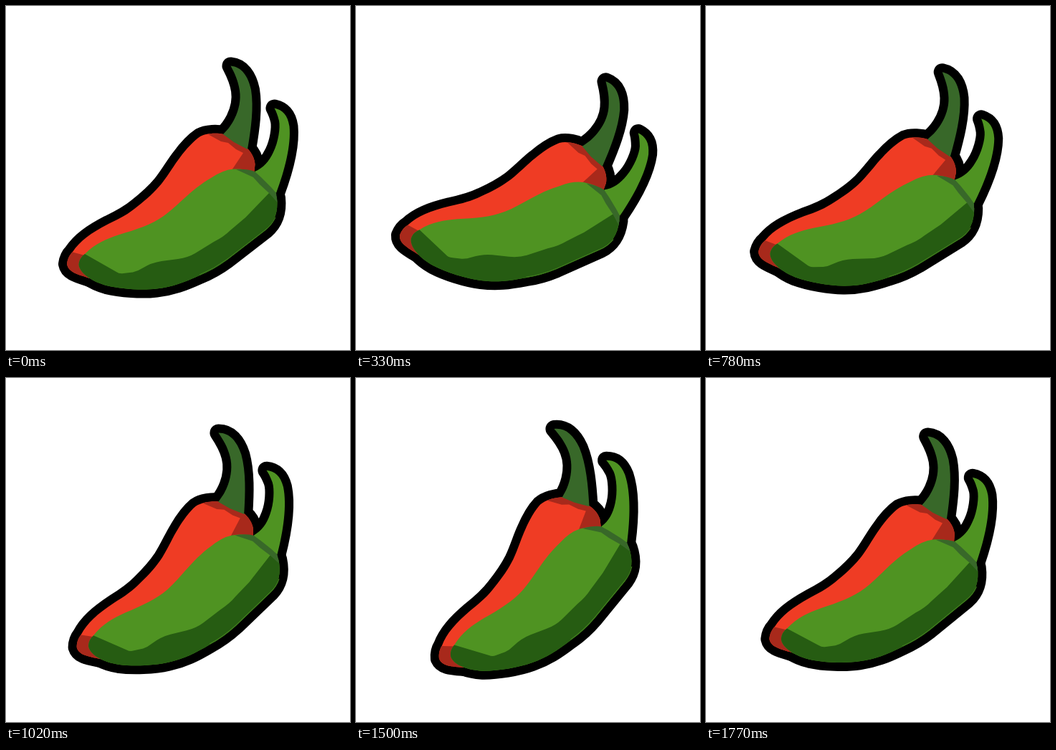
Write an HTML page that moves like this. It is 480 px wide and 480 px high and loops after 1800 ms.

```html
<!DOCTYPE html>
<html lang="en">
<head>
<meta charset="utf-8">
<title>Swaying peppers</title>
<style>
  html, body { margin: 0; width: 100%; height: 100%; overflow: hidden; background: #fff; }
  svg { display: block; width: 100vw; height: 100vh; }
  .ink { fill: #000; stroke: #000; stroke-width: 24; stroke-linejoin: round; }
  .red { fill: #ef3c24; }
  .red-shade { fill: #a8291b; }
  .green { fill: #4f9322; }
  .green-shade { fill: #265c12; }
  .moss { fill: #386829; }
  .rim { fill: none; stroke: #43801f; stroke-width: 1; }
</style>
</head>
<body>
<svg viewBox="0 0 480 480">
  <defs>
    <path id="backStem" d="M313.500 83.500C329 85 338 98 342 117C346 142 342 171 337 200L318 190L303 179C311 171 315 165 319 157C325 145 328 131 326 118C324 104 319 94 313.500 83.500Z"/>
    <path id="frontStem" d="M374.500 142.500C386 145 393 152 395.500 168C398 194 389 229 377 261L362 250L347 231C359 226 367 217 373 204C380 190 383 170 381 160C379 152 377 147 374.500 142.500Z"/>
    <path id="backBody" d="M85 360C86 352 89 347 93 343C103 328 118 317 143 304C160 296 171 290 183 280C197 269 207 260 217 248C228 234 235 221 243 211C251 200 262 188 271 182C280 177 295 177 304 179L317 184L326 191L337 199C343 205 347 213 347.500 221L346 235L250 320L140 382L117 380C98 374 87 371 85 360Z"/>
    <path id="frontBody" d="M101.500 361C102 354 105 350 110 346C125 331 140 325 158 319C182 312 203 305 220 293C240 279 258 256 286 240Q302 229 317 227.500C328 227 340 229 348 232L360 237C368 243 375 255 378 268C380 287 375 302 362 313L309 354Q290 368 270 376C248 386 232 392 210 394.500C190 397 160 395 140 390C122 385 103 374 101.500 361Z"/>
    <clipPath id="backClip"><use href="#backBody"/></clipPath>
    <clipPath id="frontClip"><use href="#frontBody"/></clipPath>
  </defs>
  <g id="peppers">
    <g class="ink">
      <use href="#backStem"/><use href="#frontStem"/>
      <use href="#backBody"/><use href="#frontBody"/>
    </g>
    <use href="#backBody" class="red"/>
    <g class="red-shade" clip-path="url(#backClip)">
      <path d="M80 340L93 343.500L114 349L125 390H80Z"/>
      <path d="M281 178.500L300 189L310 191L321 200L331 205L315 229L346 240L360 200L304 170Z"/>
    </g>
    <use href="#backStem" class="moss"/>
    <use href="#frontBody" class="green"/>
    <path class="green-shade" clip-path="url(#frontClip)" d="M110 346L154 371Q158 374 164 373L177 371.500Q184 370 190 366Q203 358 217 356L240 353Q254 351 264 345L290 329Q304 322 313 313L326 302Q335 295 341 288L367 261L395 275L340 400H90V346Z"/>
    <path class="rim" d="M376 295Q371 306 361 313L309 353Q290 367 270 375"/>
    <use href="#frontStem" class="green"/>
    <path class="moss" d="M321 228Q336 227 347 231L356 239L370 253L377 261L378.500 274L367 261L354 249L345 239L332 233Z"/>
  </g>
</svg>
<script>
  const LOOP = 1800, STEP = 30, SWING = 15;
  const peppers = document.getElementById("peppers");

  // The sway advances in fixed 30 ms steps.
  function draw(now) {
    const t = Math.floor((now % LOOP) / STEP) * STEP;
    const angle = SWING * Math.sin(2 * Math.PI * t / LOOP);
    peppers.setAttribute("transform", `rotate(${angle} 240 240)`);
    requestAnimationFrame(draw);
  }
  draw(performance.now());
</script>
</body>
</html>
```
